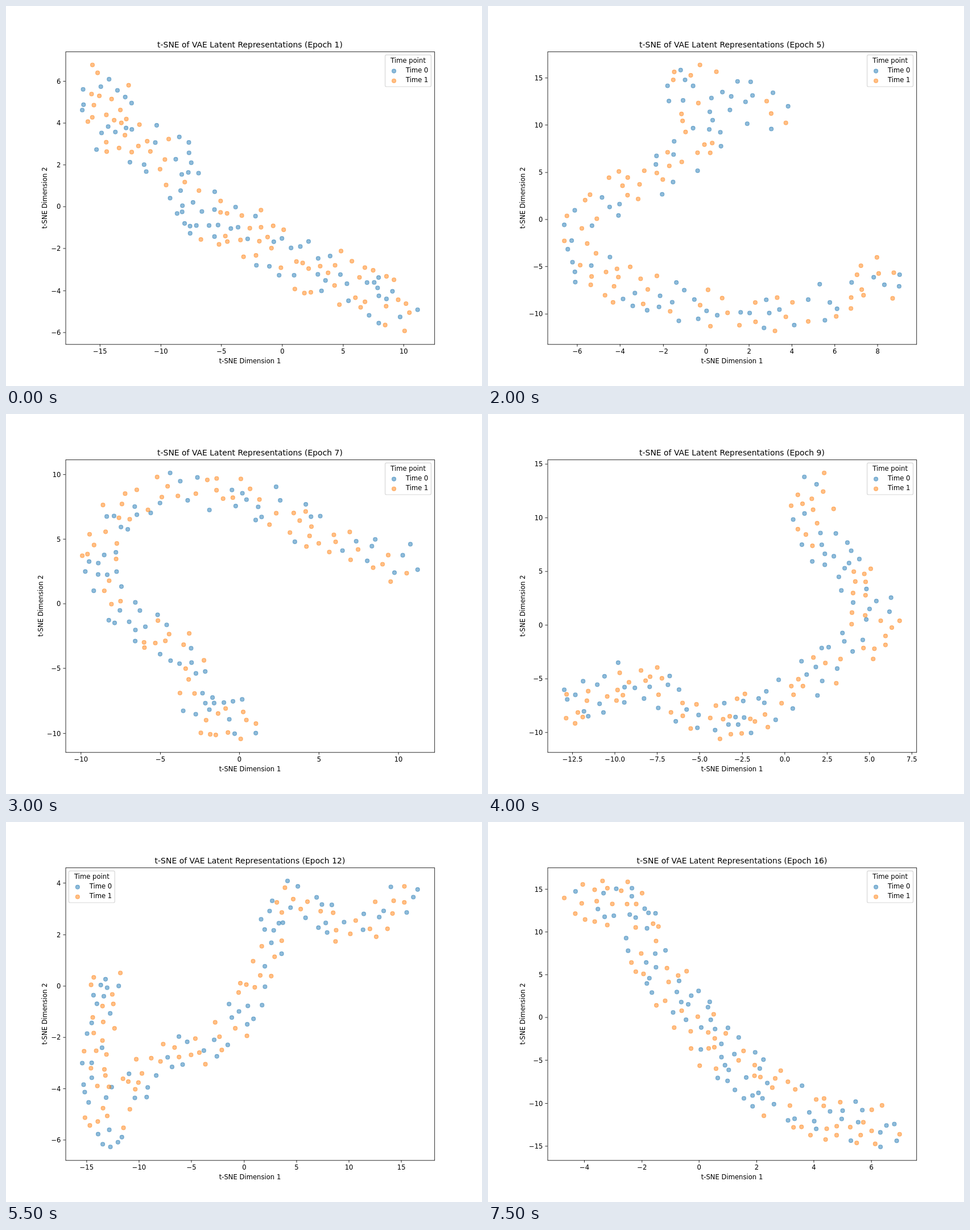
An HTML page with a canvas for the animation above (8000 ms loop, 837 by 669 pixels).

```html
<!DOCTYPE html>
<html lang="en">
<head>
<meta charset="utf-8">
<title>Latent scatter by epoch</title>
<style>
html, body { margin: 0; width: 100%; height: 100%; overflow: hidden; background: #fff; }
canvas { display: block; }
</style>
</head>
<body>
<canvas id="plot" width="837" height="669"></canvas>
<script>
const ctx = document.getElementById('plot').getContext('2d');
const EPOCHS = 16, EPOCH_MS = 500, COUNT = 152;
const BOX = { l: 125, r: 900, t: 96, b: 712 };
const LEGEND = { w: 96.6, h: 66.8, y: 103, right: 796.5, left: 131.9 };
const EM = 13.89;
const COLORS = ['#1f77b4', '#ff7f0e'];
const FONT = '"DejaVu Sans", sans-serif';

// Axis limits and a smooth path, in percent of the axes, that the dots gather around.
const shapes = {
  1: { x: [-17.83, 12.51], y: [-6.565, 7.425], r: 58,
    path: [[8, 10], [12, 26], [24, 30], [36, 52], [50, 59], [64, 70], [78, 75], [91, 84]] },
  3: { x: [-7.51, 8.84], y: [-16.17, 14.1], r: 48,
    path: [[67, 13], [50, 17], [30, 20], [12, 38], [28, 47], [48, 48], [68, 47], [86, 60], [64, 69], [55, 82], [27, 88]] },
  5: { x: [-7.39, 9.8], y: [-13.21, 17.78], r: 45,
    path: [[59, 22], [38, 12], [42, 30], [26, 44], [12, 56], [16, 72], [33, 80], [52, 86], [70, 82], [86, 74]] },
  7: { x: [-10.96, 12.25], y: [-11.47, 11.17], r: 44,
    path: [[91, 38], [70, 29], [50, 17], [24, 16], [11, 34], [19, 55], [34, 69], [40, 88], [50, 88]] },
  9: { x: [-13.97, 7.76], y: [-11.82, 15.43], r: 46,
    path: [[67, 9], [70, 28], [84, 52], [73, 68], [54, 84], [40, 86], [24, 75], [9, 82]] },
  12: { x: [-17, 18.13], y: [-6.78, 4.61], r: 36,
    path: [[10, 40], [7, 60], [9, 88], [22, 66], [36, 62], [48, 50], [55, 28], [60, 15], [72, 23], [83, 22], [92, 13]] },
  16: { x: [-5.29, 7.57], y: [-16.65, 17.5], r: 54,
    path: [[8, 14], [20, 16], [26, 33], [36, 50], [47, 68], [60, 80], [76, 89], [92, 92]] }
};

function random(seed) {
  return () => {
    seed = seed + 0x6D2B79F5 | 0;
    let t = Math.imul(seed ^ seed >>> 15, 1 | seed);
    t = t + Math.imul(t ^ t >>> 7, 61 | t) ^ t;
    return ((t ^ t >>> 14) >>> 0) / 4294967296;
  };
}

// Catmull-Rom point at u = 0..1 along the path.
function along(path, u) {
  const s = u * (path.length - 1), i = Math.floor(s), t = s - i;
  const at = k => path[Math.max(0, Math.min(path.length - 1, k))];
  return [0, 1].map(k => {
    const [a, b, c, d] = [-1, 0, 1, 2].map(n => at(i + n)[k]);
    return b + t / 2 * (c - a + t * (2 * a - 5 * b + 4 * c - d + t * (3 * (b - c) + d - a)));
  });
}

// Stretches one coordinate so that the dots span the axes less the margin.
function fit(dots, key, lo, hi, flip) {
  const all = dots.map(d => d[key]), min = Math.min(...all), max = Math.max(...all);
  const pad = (hi - lo) / 22;
  for (const d of dots) {
    const part = (d[key] - min) / (max - min);
    d[key] = lo + pad + (flip ? 1 - part : part) * (hi - lo - 2 * pad);
  }
}

// Spreads dots around the path, keeping each away from the earlier ones.
function scatter({ path, r }, seed) {
  const rnd = random(seed), dots = [];
  const candidate = () => {
    const [px, py] = along(path, rnd());
    const a = rnd() * 2 * Math.PI, d = Math.sqrt(rnd()) * r;
    return {
      x: BOX.l + px / 100 * (BOX.r - BOX.l) + d * Math.cos(a),
      y: BOX.t + py / 100 * (BOX.b - BOX.t) + d * Math.sin(a)
    };
  };
  while (dots.length < COUNT) {
    let best, far = -1;
    for (let k = 0; k < 4; k++) {
      const c = candidate();
      const gap = Math.min(1e4, ...dots.map(d => Math.hypot(d.x - c.x, d.y - c.y)));
      if (gap > far) { far = gap; best = c; }
    }
    dots.push(best);
  }
  return dots;
}

// An epoch without a shape of its own mirrors the latest one, across and upright in turn.
function makeEpoch(n) {
  let key = n;
  while (!shapes[key]) key--;
  const shape = shapes[key], flipX = (n - key) % 2 === 1, flipY = n > key && !flipX;
  const limits = ([lo, hi], flip) => flip ? [-hi, -lo] : [lo, hi];
  const dots = scatter(shape, n);
  fit(dots, 'x', BOX.l, BOX.r, flipX);
  fit(dots, 'y', BOX.t, BOX.b, flipY);
  const covered = dots.some(d => d.x > LEGEND.right && d.y < LEGEND.y + LEGEND.h);
  return {
    dots,
    x: limits(shape.x, flipX),
    y: limits(shape.y, flipY),
    legend: covered ? LEGEND.left : LEGEND.right
  };
}
const epochs = Array.from({ length: EPOCHS }, (_, i) => makeEpoch(i + 1));

function text(str, x, y, align = 'center', size = EM) {
  ctx.font = size + 'px ' + FONT;
  ctx.textAlign = align;
  ctx.fillStyle = '#000';
  ctx.fillText(str, x, y);
}

function line(x1, y1, x2, y2) {
  ctx.beginPath();
  ctx.moveTo(x1, y1);
  ctx.lineTo(x2, y2);
  ctx.stroke();
}

function dot(x, y, color) {
  ctx.globalAlpha = 0.5;
  ctx.fillStyle = ctx.strokeStyle = color;
  ctx.lineWidth = 1.39;
  ctx.beginPath();
  ctx.arc(x, y, 4.17, 0, 2 * Math.PI);
  ctx.fill();
  ctx.stroke();
  ctx.globalAlpha = 1;
}

// Ticks at the smallest round step that gives at most nine intervals.
function ticks([lo, hi], from, to) {
  const step = [1, 2, 2.5, 5, 10].find(s => (hi - lo) / s <= 9), out = [];
  for (let v = Math.ceil(lo / step) * step; v <= hi; v += step)
    out.push({
      pos: Math.floor(from + (v - lo) / (hi - lo) * (to - from)) + 0.5,
      label: (v < 0 ? '\u2212' : '') + Math.abs(v).toFixed(step % 1 ? 1 : 0)
    });
  return out;
}

function axes(e) {
  ctx.strokeStyle = '#000';
  ctx.lineWidth = 1;
  for (const { pos, label } of ticks(e.x, BOX.l, BOX.r)) {
    line(pos, BOX.b, pos, BOX.b + 5);
    text(label, pos, 732);
  }
  let wide = 0;
  for (const { pos, label } of ticks(e.y, BOX.b, BOX.t)) {
    line(BOX.l, pos, BOX.l - 5, pos);
    text(label, BOX.l - 9.7, pos + 5, 'right');
    wide = Math.max(wide, ctx.measureText(label).width);
  }
  ctx.strokeRect(BOX.l + 0.5, BOX.t + 0.5, BOX.r - BOX.l, BOX.b - BOX.t);
  text('t-SNE Dimension 1', 512.5, 752);
  ctx.save();
  ctx.translate(BOX.l - 18.6 - wide, 404);
  ctx.rotate(-Math.PI / 2);
  text('t-SNE Dimension 2', 0, 0);
  ctx.restore();
}

function legend(x) {
  ctx.beginPath();
  ctx.roundRect(x, LEGEND.y, LEGEND.w, LEGEND.h, 2.8);
  ctx.fillStyle = 'rgba(255,255,255,.8)';
  ctx.strokeStyle = 'rgba(204,204,204,.8)';
  ctx.lineWidth = 1.39;
  ctx.fill();
  ctx.stroke();
  text('Time point', x + LEGEND.w / 2, 119.3);
  COLORS.forEach((c, i) => {
    const y = 140.2 + i * 20.5;
    dot(x + 18.5, y - 3.2, c);
    text('Time ' + i, x + 43.4, y, 'left');
  });
}

function draw(now) {
  const i = Math.floor(now / EPOCH_MS) % EPOCHS, e = epochs[i];
  ctx.setTransform(0.837, 0, 0, 0.83625, 0, 0);
  ctx.fillStyle = '#fff';
  ctx.fillRect(0, 0, 1000, 800);
  COLORS.forEach((c, k) => e.dots.forEach((d, j) => { if (j % 2 === k) dot(d.x, d.y, c); }));
  axes(e);
  text(`t-SNE of VAE Latent Representations (Epoch ${i + 1})`, 512.5, 87.7, 'center', 16.67);
  legend(e.legend);
  requestAnimationFrame(draw);
}
requestAnimationFrame(draw);
</script>
</body>
</html>
```
